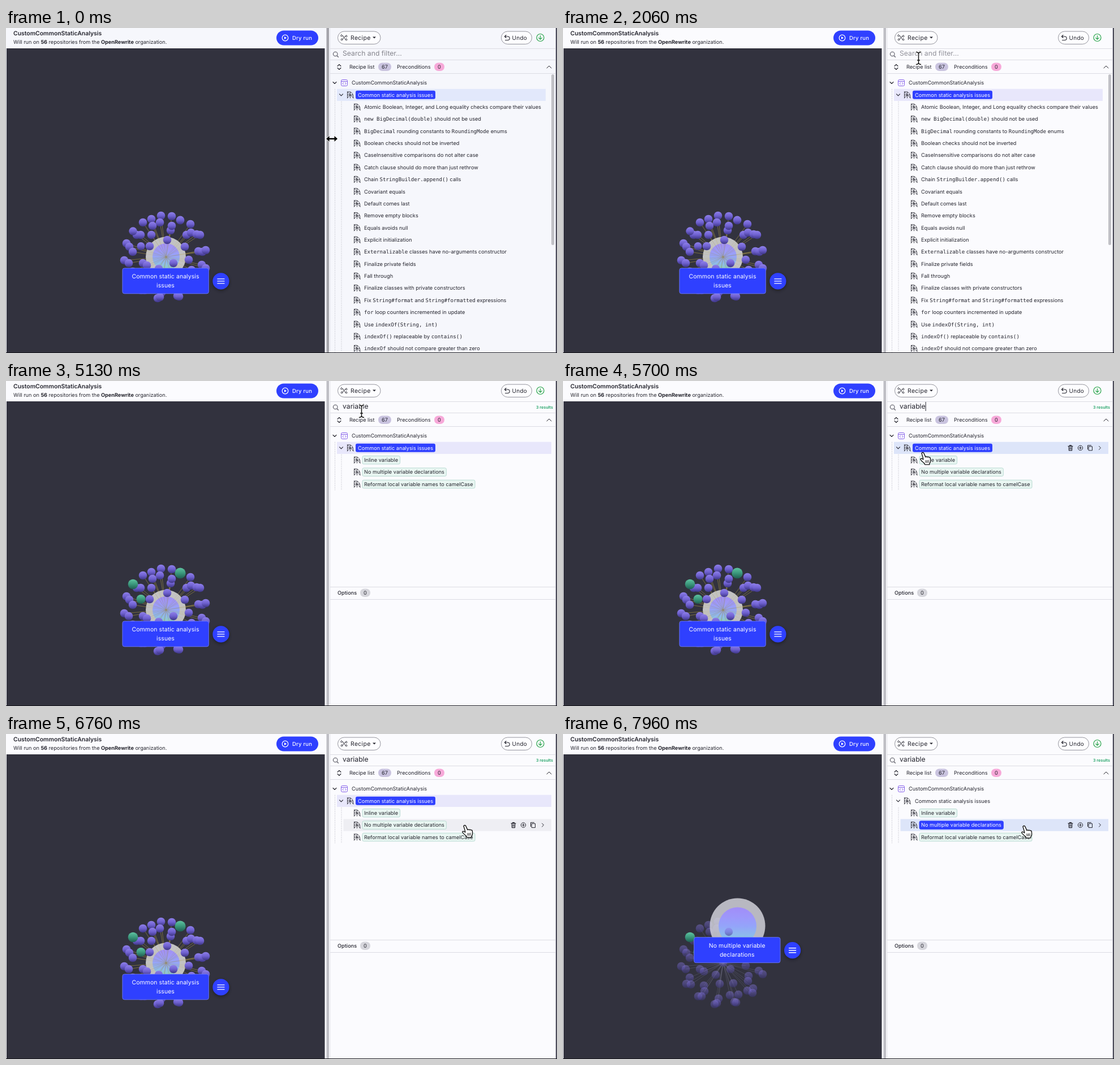
Write an HTML page with a canvas that moves like this. It is 974 px wide and 575 px high and loops after 8 s.

```html
<!DOCTYPE html>
<html lang="en">
<head>
<meta charset="utf-8">
<title>Recipe builder</title>
<style>
  html, body { margin: 0; width: 100%; height: 100%; overflow: hidden; background: #fbfbfe; }
  canvas, svg { position: absolute; left: 0; top: 0; width: 974px; height: 575px; }
  text { font-family: Inter, sans-serif; text-rendering: geometricPrecision; }
  .mono { font-family: "DejaVu Sans Mono", monospace; }
</style>
</head>
<body>
<canvas id="stage" width="974" height="575"></canvas>
<svg id="layer" viewBox="0 0 974 575">
  <g id="texts"></g>
  <g id="cursor" stroke-linejoin="round" stroke-linecap="round">
    <g id="resize"><path d="M-10 0l5.500-5v3.700h9v-3.700l5.500 5-5.500 5v-3.700h-9v3.700z" fill="#000" stroke="#fff" stroke-width="1.400" paint-order="stroke"/></g>
    <g id="beam" fill="none">
      <path stroke="#fff" stroke-width="3.400" d="M-4-11Q-1-11 0-8.500Q1-11 4-11M0-8.500V8.500M-4 11Q-1 11 0 8.500Q1 11 4 11M-2 3.500H2"/>
      <path stroke="#111" stroke-width="1.500" d="M-4-11Q-1-11 0-8.500Q1-11 4-11M0-8.500V8.500M-4 11Q-1 11 0 8.500Q1 11 4 11M-2 3.500H2"/>
    </g>
    <g id="hand" stroke="#111" stroke-width="1.400" transform="translate(-1.500 -.5) scale(.97)">
      <path fill="#fff" d="M-1.600 1.600Q-.8-.6 1.400.2Q2.400.8 3.400 3.500L5.600 8.400Q7.500 6.600 8.800 8.600Q10.600 7 11.800 8.900Q13.700 8 14.300 10.400L14.600 15Q14.600 18 12.800 20L12.600 22H4.200L3.600 20Q.5 17.500-3.600 13Q-4.400 11-2.200 10.900Q-.4 11.300 1.400 12.800Q.9 9-1.600 1.600Z"/>
      <path fill="none" stroke-width="1" d="M5.600 14.500L6 18.500M8.300 14.300V18.500M11 14.100L10.800 18.500"/>
    </g>
    <g id="arrow"><path d="M0 0V15L3.600 11.700L6 17L8.300 16L6 10.800H10.800Z" stroke="#fff" stroke-width="1.200"/></g>
  </g>
</svg>
<script>
const $ = id => document.getElementById(id);
const ctx = $('stage').getContext('2d');
const LOOP = 8000, FOUND = 4100, FILTERED = 4130, PICK = 6930;
const INK = '#25252e', BLUE = '#2f40ff', ROW = 21.36;

const clamp = v => Math.max(0, Math.min(1, v));
const mix = (a, b, k) => a + (b - a) * k;
const smooth = k => k * k * (3 - 2 * k);
const blend = (a, b, k) => `rgb(${a.map((v, i) => Math.round(mix(v, b[i], k)))})`;
const rowY = i => 97 + ROW * i;

// ---- text ----
function svg(tag, attrs, parent) {
  const el = document.createElementNS('http://www.w3.org/2000/svg', tag);
  for (const k in attrs) el.setAttribute(k, attrs[k]);
  parent.append(el);
  return el;
}
const group = () => svg('g', {}, $('texts'));
const show = (el, on) => { el.style.display = on ? '' : 'none'; };

// Backticks mark code, asterisks mark bold.
function write(parent, x, y, str, size = 9.19, weight = 400, fill = INK, more = {}) {
  const el = svg('text', { x, y, 'font-size': size, 'font-weight': weight, fill, ...more }, parent);
  str.split(/([`*][^`*]+[`*])/).forEach(part => {
    if (part[0] === '`') svg('tspan', { class: 'mono' }, el).textContent = part.slice(1, -1);
    else if (part[0] === '*') svg('tspan', { 'font-weight': 700 }, el).textContent = part.slice(1, -1);
    else el.append(part);
  });
  return el;
}

const base = group(), full = group(), hits = group(), before = group(), after = group();
const mid = { 'text-anchor': 'middle' };
write(base, 13, 13.2, 'CustomCommonStaticAnalysis', 10.43, 600);
write(base, 13, 27.8, 'Will run on *56* repositories from the *OpenRewrite* organization.', 9.15);
write(base, 506, 20.7, 'Dry run', 9.5, 500, '#fff', { 'letter-spacing': .2 });
write(base, 609, 20.7, 'Recipe', 10.5, 400, INK, { 'letter-spacing': .3 });
write(base, 894.500, 20.7, 'Undo', 10, 400, INK, { 'letter-spacing': .3 });
write(base, 607, 72, 'Recipe list');
write(base, 669.500, 72, '67', 9.19, 400, INK, mid);
write(base, 691, 72, 'Preconditions');
write(base, 766, 72, '0', 9.19, 400, INK, mid);
write(base, 611, 100.3, 'CustomCommonStaticAnalysis');
const parentText = write(base, 622, rowY(1) + 3.3, 'Common static analysis issues');
const hint = write(base, 595, 49.400, 'Search and filter...', 12.2, 400, '#85858d');
const query = write(base, 595, 49.400, '', 12.2);
const count = write(base, 967, 48.600, '3 results', 7.2, 600, '#21a366', { 'text-anchor': 'end' });

const rules = [
  'Atomic Boolean, Integer, and Long equality checks compare their values',
  '`new BigDecimal(double)` should not be used',
  '`BigDecimal` rounding constants to `RoundingMode` enums',
  'Boolean checks should not be inverted',
  'CaseInsensitive comparisons do not alter case',
  'Catch clause should do more than just rethrow',
  'Chain `StringBuilder.append()` calls',
  'Covariant equals', 'Default comes last', 'Remove empty blocks', 'Equals avoids null',
  'Explicit initialization',
  '`Externalizable` classes have no-arguments constructor',
  'Finalize private fields', 'Fall through', 'Finalize classes with private constructors',
  'Fix `String#format` and `String#formatted` expressions',
  '`for` loop counters incremented in update',
  'Use `indexOf(String, int)`',
  '`indexOf()` replaceable by `contains()`',
  '`indexOf` should not compare greater than zero'
];
rules.forEach((s, i) => write(full, 633, rowY(i + 2) + 3.3, s));
const matches = ['Inline variable', 'No multiple variable declarations', 'Reformat local variable names to camelCase']
  .map((s, i) => write(hits, 633, rowY(i + 2) + 3.3, s));
write(hits, 586, 378, 'Options', 9.19, 500);
write(hits, 635, 378, '0', 9.19, 400, INK, mid);

function label(parent, x, y, a, b) {
  const more = { ...mid, 'letter-spacing': .1 };
  write(parent, x, y, a, 10.43, 400, '#fff', more);
  write(parent, x, y + 16, b, 10.43, 400, '#fff', more);
}
label(before, 282, 442.800, 'Common static analysis', 'issues');
label(after, 307.700, 378, 'No multiple variable', 'declarations');
const chipWidth = [parentText, ...matches].map(el => el.getComputedTextLength());

// ---- shapes ----
function box(x, y, w, h, fill, r = 0, line, lw = 1) {
  ctx.beginPath();
  ctx.roundRect(x, y, w, h, r);
  if (fill) { ctx.fillStyle = fill; ctx.fill(); }
  if (line) { ctx.strokeStyle = line; ctx.lineWidth = lw; ctx.stroke(); }
}
function disc(x, y, r, fill, line, lw = 1) {
  box(x - r, y - r, 2 * r, 2 * r, fill, r, line, lw);
}
function icon(d, x, y, color = INK, lw = 1) {
  ctx.save();
  ctx.translate(x, y);
  ctx.strokeStyle = color;
  ctx.lineWidth = lw;
  ctx.lineCap = ctx.lineJoin = 'round';
  ctx.stroke(new Path2D(d));
  ctx.restore();
}
function dotted(x, y1, y2) {
  ctx.setLineDash([2, 2]);
  icon(`M0 0V${y2 - y1}`, x, y1, '#cfcfd6', .8);
  ctx.setLineDash([]);
}
const ICON = {
  recipe: 'M-5 5.500V-5.500H-1Q5.500-4.500 5.500 5.500M-5-5.500L5.500 5.500M0-5.200V5.500M-5 0H4.700M-5 5.500L0 0',
  flow: 'M-4.500-5a1.500 1.500 0 1 0 .1 0M4-4a1.500 1.500 0 1 0 .1 0M-4 2a1.500 1.500 0 1 0 .1 0M4 2a1.500 1.500 0 1 0 .1 0M-3-3.500Q0-3 0 0M2.500-2.500L-2.500 3M0 .5L2.500 3',
  window: 'M-5.500-3.500q0-2 2-2h7q2 0 2 2v7q0 2-2 2h-7q-2 0-2-2zM-5.500-2.500H5.500M-1.500-.5L-3 1.300L-1.500 3M1.500-.5L3 1.300L1.500 3',
  down: 'M-3-1.500L0 1.500L3-1.500', up: 'M-4 2L0-2L4 2', right: 'M-1.500-3L1.500 0L-1.500 3',
  sort: 'M-3-1.500L0-4.500L3-1.500M-3 1.500L0 4.500L3 1.500',
  search: 'M2.500 2.500L5 5M3.500-.5a3.800 3.800 0 1 0-7.600 0a3.800 3.800 0 1 0 7.600 0',
  undo: 'M-1.500-5L-4-2.500L-1.500 0M-4-2.500H1.500A3.200 3.200 0 0 1 1.500 4H-3',
  load: 'M0-3.500V3M-2.800.3L0 3.200L2.800.3',
  trash: 'M-4-3H4M-1.500-3V-4.500H1.500V-3M-3-3L-2.600 4.500H2.600L3-3M-1-1V2.500M1-1V2.500',
  plus: 'M0-2.200V2.200M-2.200 0H2.200',
  copy: 'M-2-2.500H4V4.500H-2ZM-4 2.500V-4.500H2'
};

function rowTools(right, y) {
  const x = right - 67;
  icon(ICON.trash, x, y, INK, 1.1);
  disc(x + 17.500, y, 4.200, null, INK);
  icon(ICON.plus, x + 17.500, y);
  icon(ICON.copy, x + 34.500, y);
  icon(ICON.right, x + 52, y);
}

// ---- graph ----
const hub = [283, 405], pickNode = [308, 340];
const nodes = [
  274,332, 257,338, 242,344, 293,333, 326,347, 272,344, 259,350, 291,358, 293,350,
  238,366, 231,366, 257,366, 319,366, 327,362, 337,365, 343,366, 213,381, 218,387,
  224,396, 254,386, 285,375, 316,387, 340,395, 347,396, 353,393, 209,411, 217,416,
  242,416, 249,420, 296,416, 323,410, 346,419, 353,425, 270,426, 224,431, 328,428,
  218,442, 226,443, 249,445, 277,442, 301,441, 327,437, 336,450, 326,454, 335,458,
  250,455, 239,464, 245,464, 275,468, 295,462, 310,461, 268,478, 272,476, 303,474, 306,475
];
const VIOLET = ['#8f80ea', '#6f61d0', '#3d3585'], GREEN = ['#5fc4a1', '#3b977c', '#1f5d50'];

function shade(x, y, r, tones, alpha) {
  const g = ctx.createLinearGradient(0, y - r, 0, y + r);
  tones.forEach((c, i) => g.addColorStop(i / (tones.length - 1), c));
  ctx.globalAlpha = alpha;
  disc(x, y, r, g);
  ctx.globalAlpha = 1;
}
const ball = (x, y, r, tones, alpha = 1) => shade(x, y, r, tones, alpha);
const orb = (x, y, r, alpha) =>
  shade(x, y, r, ['#a18df8', '#9d97fb', '#94a4fa', '#8cbcec', '#8ed6a8'], alpha);

function drawLabel(x, y) {
  box(x, y, 152.400, 45, BLUE, 3.500, '#7682ff', .8);
  ctx.shadowColor = 'rgba(0,0,0,.4)';
  ctx.shadowBlur = 6;
  ctx.shadowOffsetY = 2;
  disc(x + 174, y + 23, 14.600, BLUE);
  ctx.shadowColor = 'transparent';
  icon('M-6-4H6M-6 0H6M-6 4H6', x + 174, y + 23, '#fff', 1.4);
}
function drawLinks(color) {
  ctx.strokeStyle = color;
  ctx.lineWidth = .9;
  ctx.beginPath();
  for (let i = 0; i < nodes.length; i += 2) {
    ctx.moveTo(...hub);
    ctx.lineTo(nodes[i], nodes[i + 1]);
  }
  ctx.stroke();
}
function drawGraph(t) {
  const k = smooth(clamp((t - PICK) / 370)), found = t >= FOUND, picked = t >= PICK;
  const [hx, hy] = hub, [px, py] = pickNode, dim = mix(1, .4, k);
  const tone = found ? GREEN : VIOLET;
  drawLinks(`rgba(${mix(156, 118, k)},${mix(138, 118, k)},${mix(62, 140, k)},${mix(.62, .36, k)})`);
  ctx.globalAlpha = 1 - k;
  disc(hx - .5, hy, mix(35.500, 12, k), 'rgba(222,222,220,.84)');
  ctx.globalAlpha = 1;
  if (k < 1) {
    orb(hx, hy, mix(24, 8, k), .95 * (1 - k));
    drawLinks(`rgba(150,138,90,${.22 * (1 - k)})`);
  }
  if (k > 0) ball(hx, hy, 7, VIOLET, .4 * k);
  for (let i = 0; i < nodes.length; i += 2) ball(nodes[i], nodes[i + 1], 7.300, VIOLET, dim);
  ball(224.500, 359.500, found ? 8.800 : 7.200, tone);
  ball(238.500, 386, found ? 8 : 7, tone);
  if (picked) {
    disc(px + .5, py - .5, mix(9.500, 49, k), `rgba(214,214,222,${.82 * k})`);
    ball(px, py, 9.500, GREEN, 1 - k);
    orb(px + .5, py, mix(9.500, 33.500, k), k);
    ball(293, 350, 7.200, VIOLET, .55 * k);
    drawLabel(231.600, 359.700);
  } else {
    ball(px, py, found ? 9.600 : 7.400, tone);
    drawLabel(205.900, 424.900);
  }
}

// ---- pointer ----
const path = [
  [0, 576, 196], [460, 576, 196], [960, 620, 61], [1160, 629, 54.500], [1840, 629, 54.500],
  [1860, 628.500, 53.500], [5180, 628.500, 53.500], [5700, 637, 127], [5930, 668, 157],
  [6360, 812, 162], [7540, 812, 162], [7730, 814.500, 162], [7920, 814.500, 162],
  [7960, 816, 163], [LOOP, 816, 163]
];
function slope(i, a) {
  const p = path[i - 1], q = path[i], n = path[i + 1];
  if (!p || !n || p[a] === q[a] || q[a] === n[a]) return 0;
  return (n[a] - p[a]) / (n[0] - p[0]);
}
function pointer(t) {
  const i = path.findIndex((p, j) => t < path[j + 1][0]);
  const a = path[i], b = path[i + 1], d = b[0] - a[0], s = (t - a[0]) / d;
  return [1, 2].map(n => mix(a[n], b[n], smooth(s)) +
    d * s * (1 - s) * ((1 - s) * slope(i, n) - s * slope(i + 1, n)));
}

// ---- search field ----
const keys = [2700, 2830, 2960, 3060, 3260, 3330, 3530, 3630];
const blinks = [1530, 2060, 2530, 4130, 4630, 5130, 5630, 6130, 6630, 6760];

function drawPanel(t, x, y) {
  const wide = t < FILTERED, picked = t >= PICK, right = wide ? 954 : 964;
  const fade = clamp(t / 300), end = wide ? 574 : 193;
  const line = '#dcdce3';
  box(573, 36, 398, 1, line);
  box(573, 56, 398, 1, line);
  box(573, 80, 398, 1, line);

  box(586.500, 6, 75.500, 22.500, '#fdfdff', 11.2, '#7a7a85', .8);
  icon(ICON.flow, 597.500, 17, INK, .9);
  ctx.fillStyle = INK;
  ctx.fill(new Path2D('M648 15.500h6l-3 3z'));
  box(875.500, 6, 54, 22.500, '#fdfdff', 11.2, '#7a7a85', .8);
  icon(ICON.undo, 885.500, 17.500, INK, 1.1);
  disc(944.500, 17, 6.500, null, '#27a34a', 1.2);
  icon(ICON.load, 944.500, 17, '#27a34a', 1.2);
  icon(ICON.search, 582.500, 46.500, '#55555f', 1.1);
  icon(ICON.sort, 589, 69, INK, 1.1);
  icon(ICON.up, 960, 69, INK, 1);
  box(658, 61.500, 23, 14.500, '#c9c3df', 7.2);
  box(757, 61.500, 18, 14.500, '#f7a9d9', 7.2);

  const chosen = picked ? 3 : 1, under = x > 585 && y > 86 ? Math.round((y - 97) / ROW) : -1;
  const stripe = (i, color) => {
    const left = i ? (i > 1 ? 596.500 : 585) : 574;
    box(left, rowY(i) - 10.600, right - left, 21.200, color);
  };
  if (under >= 0 && under !== chosen) stripe(under, '#eeeef3');
  stripe(chosen, under === chosen ? '#dde5f9' : blend([226, 232, 251], [232, 231, 251], fade));
  if (under > 0 && !(wide && under === 2)) rowTools(right, rowY(under));

  dotted(581.500, 108, end);
  dotted(593, 130, end);
  icon(ICON.down, 581, 97, INK, 1.1);
  icon(ICON.window, 598, 97, '#8560ea', 1);
  icon(ICON.down, 592.500, rowY(1), INK, 1.1);
  icon(ICON.recipe, 608.500, rowY(1), '#33333c', .9);
  const rows = wide ? rules.length : matches.length;
  for (let i = 0; i < rows; i++) icon(ICON.recipe, 620.500, rowY(i + 2), '#33333c', .9);

  if (!picked) box(618, rowY(1) - 7.500, chipWidth[0] + 8, 15, BLUE, 3);
  if (wide) box(964, 82, 5, 302, '#c1c1c6', 2.500);
  else {
    matches.forEach((m, i) => {
      const on = picked && i === 1;
      box(630, rowY(i + 2) - 7.200, chipWidth[i + 1] + 6.500, 14.500, on ? BLUE : '#e9f6f2', 2.500, on ? BLUE : '#b4d9d0', .9);
    });
    box(573, 364, 398, 1, line);
    box(573, 386, 398, 1, line);
    box(626, 367.500, 18, 14.500, '#d6d6dc', 7.2);
  }
}

function frame(t) {
  const [x, y] = pointer(t), fade = clamp(t / 300);
  const wide = t < FILTERED, picked = t >= PICK;
  ctx.clearRect(0, 0, 974, 575);
  box(0, 0, 974, 575, blend([246, 247, 252], [251, 251, 254], fade));
  box(1, 36, 562.500, 539, '#32323e');
  drawGraph(t);
  box(478, 4.500, 74, 26, BLUE, 13);
  disc(493.500, 17.500, 5.300, null, '#fff', 1.2);
  ctx.fillStyle = '#fff';
  ctx.fill(new Path2D('M492 15l4 2.500-4 2.500z'));
  box(566.500, 0, 4.500, 575, blend([164, 164, 170], [190, 190, 196], fade));
  box(572.500, 0, .8, 575, '#dcdce3');
  drawPanel(t, x, y);
  box(971, 0, 1, 575, '#dcdce6');
  box(972, 0, 2, 575, '#4b4b58');
  box(0, 574, 974, 1, '#16161c');

  const typed = 'variable'.slice(0, keys.filter(k => t >= k).length);
  query.textContent = typed;
  show(hint, !typed);
  hint.setAttribute('fill', t < 1530 ? '#85858d' : '#92929a');
  if (blinks.filter(b => t >= b).length % 2) {
    box(595 + (typed ? query.getComputedTextLength() : 0), 37, 1, 16, INK);
  }
  show(count, t >= FOUND);
  show(full, wide);
  show(hits, !wide);
  show(before, !picked);
  show(after, picked);
  parentText.setAttribute('fill', picked ? INK : '#fff');
  matches[1].setAttribute('fill', picked ? '#fff' : INK);

  const kind = x < 582 ? 'resize' : y < 66 ? 'beam' : y < 86 ? 'arrow' : 'hand';
  ['resize', 'beam', 'arrow', 'hand'].forEach(id => show($(id), id === kind));
  $('cursor').setAttribute('transform', `translate(${x} ${y})`);
}

let start;
function tick(now) {
  start ??= now;
  frame((now - start) % LOOP);
  requestAnimationFrame(tick);
}
frame(0);
requestAnimationFrame(tick);
</script>
</body>
</html>
```
